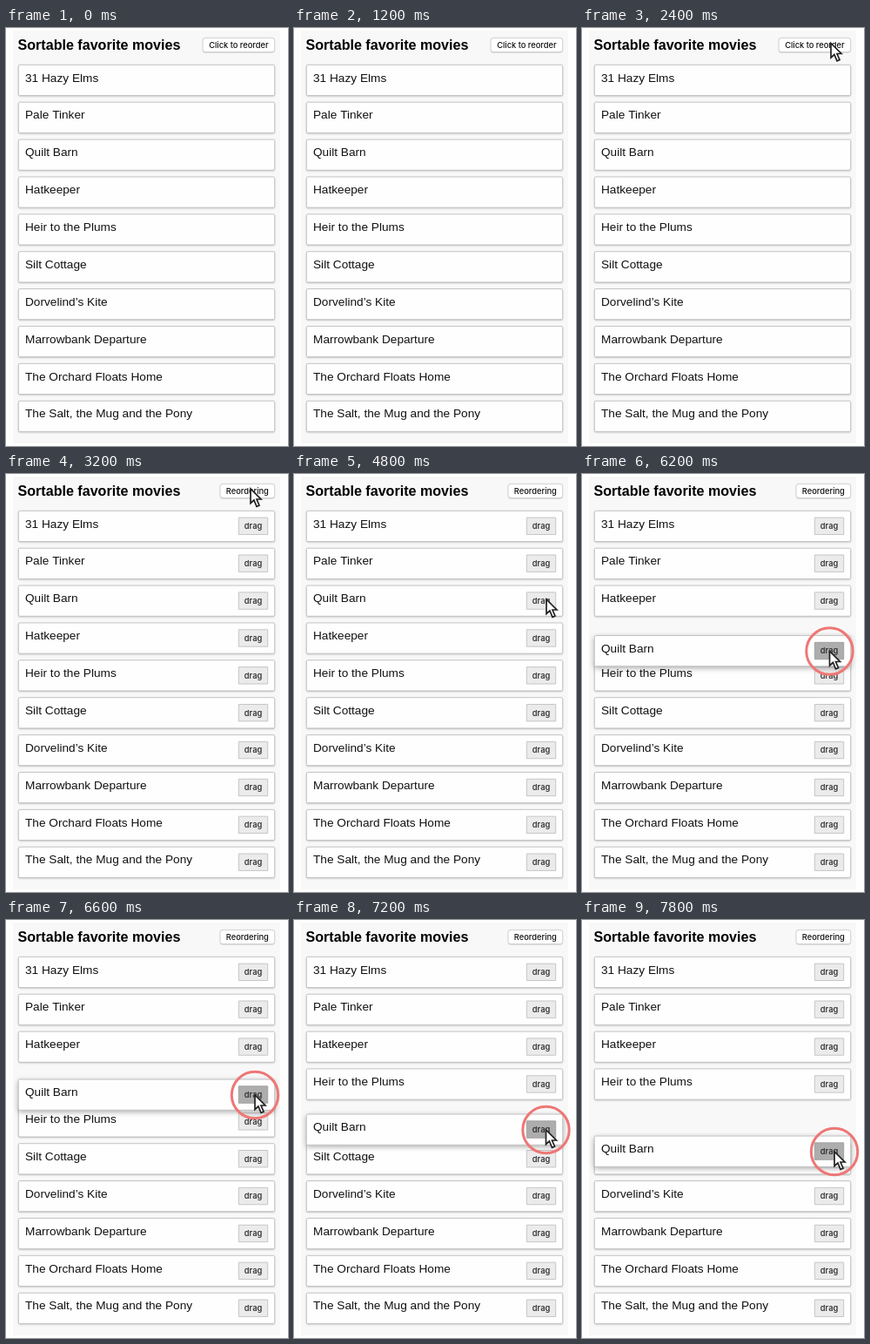
Animation, 324 px wide and 480 px high, one loop 8000 ms. Source, as an HTML page with a canvas:

```html
<!DOCTYPE html>
<html lang="en">
<head>
<meta charset="utf-8">
<title>Sortable list</title>
<style>
  html, body { margin: 0; width: 100%; height: 100%; overflow: hidden; background: #fff; }
  canvas { display: block; width: 324px; height: 480px; }
</style>
</head>
<body>
<canvas id="stage"></canvas>
<script>
const W = 324, H = 480, LOOP = 8000, STEP = 200;
const CARD = { x: 14.3, y: 42.3, w: 294.4, h: 35.2, pitch: 42.88 };
const SHOW_HANDLES = 3200, PRESS = 5000, GRAB_Y = 146, DRAGGED = 2;
const SANS = '"Liberation Sans", Arial, sans-serif';
const UI = '500 9.3px Inter, sans-serif';

const titles = [
  '31 Hazy Elms', 'Pale Tinker', 'Quilt Barn', 'Hatkeeper',
  'Heir to the Plums', 'Silt Cottage', 'Dorvelind’s Kite',
  'Marrowbank Departure', 'The Orchard Floats Home',
  'The Salt, the Mug and the Pony'
];

// Pointer path: time, x, y
const path = [
  [2000, 311, 2], [2400, 286, 17.5], [2600, 284, 23], [3000, 281, 17],
  [3400, 281, 17], [4600, 290, 140], [4800, 290, 144], [5000, 291, 146],
  [5400, 291, 146], [6000, 285, 188], [6200, 284.5, 203.5],
  [6600, 286, 201], [7000, 288, 219], [7200, 289.5, 241],
  [7600, 289.5, 244], [7800, 290, 266]
];

const canvas = document.getElementById('stage');
const ctx = canvas.getContext('2d');
const ratio = window.devicePixelRatio || 1;
canvas.width = W * ratio;
canvas.height = H * ratio;

function pointerAt(t) {
  if (t < path[0][0]) return null;
  const next = path.findIndex(p => p[0] > t);
  if (next < 0) {
    const [, x, y] = path[path.length - 1];
    return { x, y };
  }
  const [t0, x0, y0] = path[next - 1], [t1, x1, y1] = path[next];
  const k = (t - t0) / (t1 - t0);
  return { x: x0 + (x1 - x0) * k, y: y0 + (y1 - y0) * k };
}

function text(str, x, y, font, align = 'left', color = '#111') {
  ctx.font = font;
  ctx.textAlign = align;
  ctx.fillStyle = color;
  ctx.fillText(str, x, y);
}

function box(x, y, w, h, r, fill, stroke, shadow) {
  ctx.beginPath();
  ctx.roundRect(x, y, w, h, r);
  ctx.save();
  if (shadow) {
    ctx.shadowColor = shadow.color;
    ctx.shadowBlur = shadow.blur * ratio;
    ctx.shadowOffsetY = shadow.dy * ratio;
  }
  ctx.fillStyle = fill;
  ctx.fill();
  ctx.restore();
  ctx.lineWidth = 1;
  ctx.strokeStyle = stroke;
  ctx.stroke();
}

function drawButton(label, x) {
  box(x, 11.3, 308.7 - x, 16.2, 3, '#fff', '#d0d0d0',
    { color: 'rgba(0,0,0,.2)', blur: 1, dy: 1 });
  text(label, (x + 308.7) / 2, 23, UI, 'center');
}

function drawCard(title, y, handle, lifted) {
  const shadow = lifted
    ? { color: 'rgba(0,0,0,.35)', blur: 6, dy: 2 }
    : { color: 'rgba(0,0,0,.25)', blur: 2, dy: 1 };
  box(CARD.x, y, CARD.w, CARD.h, 1.5, '#fefefe', '#c4c4c6', shadow);
  text(title, 22, y + 19.2, '13.67px ' + SANS);
  if (!handle) return;
  box(267.3, y + 7.8, 33.4, 19.4, 0, lifted ? '#adadad' : '#ebebeb', lifted ? '#a2a2a2' : '#c6c6c6');
  text('drag', 284, y + 20.8, UI, 'center', '#222');
}

function drawPointer({ x, y }) {
  ctx.save();
  ctx.translate(x, y);
  ctx.beginPath();
  [[0, 0], [0, 16.5], [3.9, 13], [7, 20.3], [10, 19], [7, 12], [12, 12]]
    .forEach(([px, py]) => ctx.lineTo(px, py));
  ctx.closePath();
  ctx.fillStyle = '#fff';
  ctx.fill();
  ctx.lineWidth = 1.7;
  ctx.strokeStyle = '#222';
  ctx.stroke();
  ctx.restore();
}

function drawRing({ x, y }) {
  ctx.beginPath();
  ctx.arc(x, y, 26.7, 0, Math.PI * 2);
  ctx.lineWidth = 3;
  ctx.strokeStyle = '#ee7775';
  ctx.stroke();
}

const slotY = i => CARD.y + i * CARD.pitch;

function draw(t) {
  const pointer = pointerAt(t);
  const handles = t >= SHOW_HANDLES;
  const dragging = t >= PRESS;

  ctx.setTransform(ratio, 0, 0, ratio, 0, 0);
  ctx.fillStyle = '#fefefe';
  ctx.fillRect(0, 0, W, H);
  ctx.fillStyle = '#f8f8f8';
  ctx.fillRect(8, 3, 307, 474);

  text('Sortable favorite movies', 13.5, 24.7, 'bold 16.1px ' + SANS, 'left', '#000');
  drawButton(handles ? 'Reordering' : 'Click to reorder', handles ? 246 : 226);

  const liftedY = dragging ? slotY(DRAGGED) + pointer.y - GRAB_Y : 0;
  const gap = dragging
    ? Math.max(DRAGGED, Math.floor((liftedY - CARD.y + 0.5) / CARD.pitch))
    : DRAGGED;
  titles.forEach((title, i) => {
    if (dragging && i === DRAGGED) return;
    const slot = i > DRAGGED && i <= gap ? i - 1 : i;
    drawCard(title, slotY(slot), handles, false);
  });

  if (dragging) {
    drawCard(titles[DRAGGED], liftedY, true, true);
    drawRing(pointer);
  }
  if (pointer) drawPointer(pointer);
}

const start = performance.now();
function tick() {
  const t = (performance.now() - start) % LOOP;
  draw(Math.floor(t / STEP) * STEP);
  requestAnimationFrame(tick);
}
tick();
</script>
</body>
</html>
```
